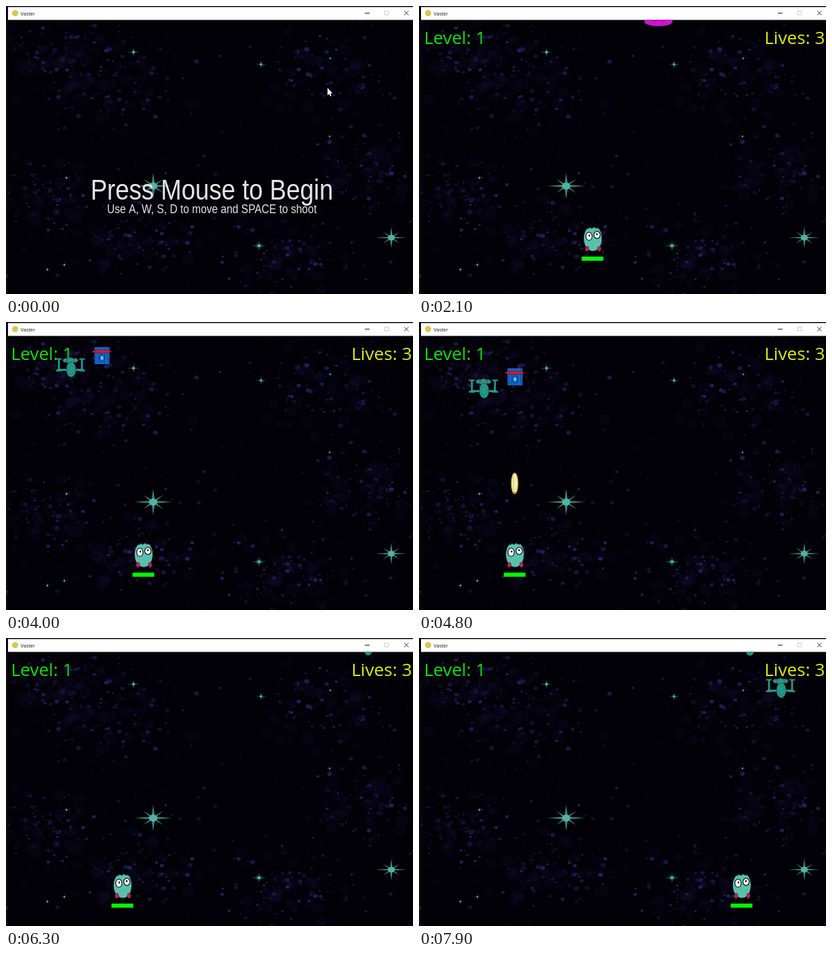
Write an HTML page with a canvas that moves like this. It is 600x424 px and loops after 8 s.

```html
<!DOCTYPE html>
<html lang="en">
<head>
<meta charset="utf-8">
<title>Vaster</title>
<style>
  html, body { margin: 0; width: 100%; height: 100%; overflow: hidden; background: #000; }
  canvas { display: block; }
</style>
</head>
<body>
<canvas id="stage" width="600" height="424"></canvas>
<script>
const W = 600, H = 424, BAR = 20, LOOP = 8000, TICK = 100, START = 800;
const PLAYER_SPEED = 0.19, ENEMY_SPEED = 0.039, SHOT_SPEED = 0.39; // px per ms
const SHOT_FROM = 343, CONTACT = 29;
const SQUEEZE = 0.85; // the game window is narrower than its native aspect
const TAU = Math.PI * 2;
const stage = document.getElementById('stage').getContext('2d');
let ctx = stage;

// The player heads for each goal at constant speed on both axes.
const HOME = { x: 214, y: 449 };
const GOALS = [
  { at: 1500, y: 343 }, { at: 1880, x: 364 }, { at: 3150, x: 141 }, { at: 4900, x: 98 },
  { at: 5515, x: 162 }, { at: 5850, y: 365 }, { at: 6250, x: W }
];
// "enters" is when the centre passes the title bar, "shot" when it is fired at.
const ENEMIES = [
  { draw: squid, x: 353, enters: 2231, shot: 2687, shotX: 364 },
  { draw: drone, x: 95, enters: 2808, shot: 5272, shotX: 98 },
  { draw: box, x: 141, enters: 3256, shot: 4530, shotX: 141 },
  { draw: drone, x: 533, enters: 6530 },
  { draw: drone, x: 487, enters: 8118 }
];
// x, y, reach
const STARS = [
  [188, 68, 10], [376, 86, 9], [478, 77, 5], [477, 192, 5], [89, 253, 6],
  [217, 265, 28], [568, 341, 23], [373, 353, 11], [86, 381, 6], [61, 388, 6]
];
const CLOUDS = [
  [80, 72, 62], [155, 118, 66], [465, 95, 66], [50, 280, 58],
  [185, 345, 66], [535, 245, 56], [420, 375, 60], [300, 220, 300]
];

function seeded(seed) {
  return () => {
    seed = (seed + 0x6D2B79F5) | 0;
    let v = Math.imul(seed ^ (seed >>> 15), seed | 1);
    v ^= v + Math.imul(v ^ (v >>> 7), v | 61);
    return ((v ^ (v >>> 14)) >>> 0) / 4294967296;
  };
}

function rect(x, y, w, h, fill) {
  ctx.fillStyle = fill;
  ctx.fillRect(x, y, w, h);
}

function oval(x, y, rx, ry, fill, stroke, width = 1) {
  ctx.beginPath();
  ctx.ellipse(x, y, rx, ry, 0, 0, TAU);
  if (fill) { ctx.fillStyle = fill; ctx.fill(); }
  if (stroke) { ctx.strokeStyle = stroke; ctx.lineWidth = width; ctx.stroke(); }
}

function line(color, width, ...points) {
  ctx.beginPath();
  points.forEach(([x, y]) => ctx.lineTo(x, y));
  ctx.strokeStyle = color;
  ctx.lineWidth = width;
  ctx.stroke();
}

function label(text, x, y, font, fill, align = 'left', squeeze = 1) {
  ctx.save();
  ctx.translate(x, y);
  ctx.scale(squeeze, 1);
  ctx.font = font;
  ctx.textAlign = align;
  ctx.fillStyle = fill;
  ctx.fillText(text, 0, 0);
  ctx.restore();
}

function put(draw, x, y) {
  ctx.save();
  ctx.translate(x, y);
  draw();
  ctx.restore();
}

function spikes(reach, waist, turn) {
  ctx.beginPath();
  for (let i = 0; i < 8; i++) {
    const r = i % 2 ? reach * waist : reach, a = i * TAU / 8 + turn;
    ctx.lineTo(Math.cos(a) * r, Math.sin(a) * r * 0.7);
  }
  ctx.fill();
}

function star(reach) {
  ctx.fillStyle = '#348a80';
  spikes(reach, 0.12, 0);
  if (reach > 10) spikes(reach * 0.75, 0.12, TAU / 8);
  oval(0, 0, reach * 0.22, reach * 0.19, '#55b0a3');
}

function cloud(x, y, spread, rand) {
  const bell = () => (rand() + rand() + rand() - 1.5) * 1.5;
  for (let i = 0; i < 240; i++) {
    const haze = i < 40 && spread < 100;
    const r = haze ? 4 + 5 * rand() : 0.5 + 2.6 * rand() ** 4;
    const fill = haze ? 'rgba(22, 18, 62, 0.16)' : `hsl(246 52% ${8 + 17 * rand() ** 1.4}%)`;
    oval(x + bell() * spread, y + bell() * spread * 0.65, r * 1.2, r, fill);
  }
}

function titleBar() {
  rect(3, 1.5, W - 3, BAR - 1, '#fff');
  oval(13.5, 10.5, 4.5, 4.5, '#d8c552');
  label('Vaster', 21.5, 13.5, '7.3px "Open Sans", sans-serif', '#111');
  line('#222', 1, [529, 10.5], [536, 10.5]);
  ctx.strokeStyle = '#ccc';
  ctx.strokeRect(558.5, 7.5, 5.5, 5.5);
  line('#222', 0.9, [587, 7.5], [593.5, 13.5]);
  line('#222', 0.9, [593.5, 7.5], [587, 13.5]);
}

function makeBackdrop() {
  const canvas = document.createElement('canvas');
  canvas.width = W;
  canvas.height = H;
  ctx = canvas.getContext('2d');
  const rand = seeded(41);
  rect(0, 0, W, H, '#020107');
  CLOUDS.forEach(([x, y, spread]) => cloud(x, y, spread, rand));
  STARS.forEach(([x, y, reach]) => put(() => star(reach), x, y));
  rect(0, 0, W, 1.5, '#050505');
  rect(0, 0, 3, H, '#0b0b0c');
  label('c', -1, 400, '8px "Open Sans", sans-serif', '#777');
  titleBar();
  ctx = stage;
  return canvas;
}

function squid() {
  const pink = '#d312d0';
  ctx.lineCap = 'round';
  for (let i = -2; i <= 2; i++) {
    const x = i * 6.5;
    ctx.beginPath();
    ctx.moveTo(x * 0.7, 3);
    ctx.bezierCurveTo(x - 5, -4, x + 7, -6, x + 1, -12);
    ctx.strokeStyle = '#a50fa8';
    ctx.lineWidth = 1.8;
    ctx.stroke();
    oval(x + 1, -12.5, 1.9, 1.6, pink);
  }
  oval(0, 4, 13, 7, pink);
  oval(0, 8, 20.8, 6.8, pink);
  for (const x of [-6, 7]) {
    oval(x, 4, 4, 3, '#e9c9e8', '#401040', 1);
    oval(x, 4, 1.4, 1.6, '#111');
  }
}

function drone() {
  const teal = '#279986', dark = '#12584f';
  line(teal, 3, [-19, 4], [19, 4]);
  for (const s of [-1, 1]) {
    line(teal, 2.8, [17 * s, -12], [17 * s, 5]);
    line(teal, 2, [13 * s, -12], [21.5 * s, -12]);
    line(teal, 2.4, [13 * s, 5], [21.5 * s, 5]);
    oval(6.5 * s, -10, 4.5, 3, teal, dark, 0.7);
  }
  oval(0, -9.5, 6, 4.5, teal, dark, 0.7);
  for (const x of [-4, 5]) oval(x, -10, 1.5, 1.1, '#b33a50');
  oval(1, 3.5, 7, 11, teal, dark, 0.9);
  oval(1, 4, 4.2, 7, null, '#1c7a6c', 0.8);
}

function box() {
  rect(-10.5, -12, 22, 25, '#1768cf');
  for (let i = 0; i < 5; i++) line('#0b3c86', 0.8, [-8 + i * 4.2, -11], [-9 + i * 4.5, 12]);
  oval(0.5, 4, 4, 5, '#1b7fdd', '#06245a', 1);
  oval(0.5, 4, 1.3, 2.5, '#8bd6e8');
  oval(0, -5.5, 14, 2.5, '#c21f3c', '#701030', 0.7);
}

function shot() {
  oval(0, 0, 4.7, 15, '#f1edcb', '#d5b82c', 1.5);
  line('#dcb94a', 0.8, [-1.5, -10], [-1.5, 10]);
  oval(0, 13.5, 2, 1.5, '#d98024');
}

function player() {
  ctx.beginPath();
  ctx.moveTo(-5, -17);
  ctx.bezierCurveTo(-15, -12, -15, 7, -7, 15);
  ctx.quadraticCurveTo(1, 20.5, 8, 15);
  ctx.bezierCurveTo(16, 7, 15, -12, 7, -17);
  ctx.closePath();
  ctx.fillStyle = '#58c1ae';
  ctx.fill();
  for (const x of [-8, 10]) oval(x, 14.5, 2.6, 3.7, '#b92b51', '#5c1830', 0.7);
  line('#101a20', 1.6, [-7, -15], [-4, -17.5], [-1, -16], [2, -18], [5, -16.5], [8, -16]);
  oval(-5.2, -4, 4.6, 6, '#fff', '#111', 1.2);
  oval(6.7, -6, 4.6, 5.3, '#fff', '#111', 1.2);
  oval(-4.5, -5, 1.3, 1.4, '#111');
  oval(6.5, -7, 1.3, 1.4, '#111');
  rect(-16, 26, 32, 6, '#00ff00');
}

function cursor() {
  ctx.beginPath();
  [[0, 0], [0, 11], [2.5, 9], [4.2, 12.5], [5.8, 11.8], [4.2, 8.3], [7.3, 8]]
    .forEach(([x, y]) => ctx.lineTo(x, y));
  ctx.fillStyle = '#fff';
  ctx.fill();
}

function approach(from, to, reach) {
  return from + Math.sign(to - from) * Math.min(Math.abs(to - from), reach);
}

function playerAt(t) {
  let { x, y } = HOME;
  for (const goal of GOALS) {
    const reach = Math.max(0, t - goal.at) * PLAYER_SPEED;
    x = approach(x, goal.x ?? x, reach);
    y = approach(y, goal.y ?? y, reach);
  }
  return [x, y];
}

const enemyY = (enemy, t) => BAR + (t - enemy.enters) * ENEMY_SPEED;
const shotY = (enemy, t) => SHOT_FROM - (t - enemy.shot) * SHOT_SPEED;
const isHit = (enemy, t) => shotY(enemy, t) - enemyY(enemy, t) < CONTACT;

function intro() {
  const sans = '"Liberation Sans", Arial, sans-serif';
  label('Press Mouse to Begin', 303.5, 285, `43px ${sans}`, '#e4e4e4', 'center', SQUEEZE);
  label('Use A, W, S, D to move and SPACE to shoot', 303.5, 305, `18.3px ${sans}`,
    '#e4e4e4', 'center', SQUEEZE);
  put(cursor, 474, 120.5);
}

function game(t) {
  const font = '26.2px "Open Sans", sans-serif';
  label('Level: 1', 7.5, 55.5, font, '#08e408');
  label('Lives: 3', 598.5, 55.5, font, '#dcea08', 'right');
  const alive = ENEMIES.filter(enemy => !isHit(enemy, t));
  alive.forEach(enemy => put(enemy.draw, enemy.x, enemyY(enemy, t)));
  put(player, ...playerAt(t));
  alive.filter(enemy => t >= enemy.shot)
    .forEach(enemy => put(shot, enemy.shotX, shotY(enemy, t)));
}

const backdrop = makeBackdrop();
const begin = performance.now();

function frame() {
  const elapsed = Math.max(0, performance.now() - begin) % LOOP;
  const t = Math.floor(elapsed / TICK) * TICK;
  ctx.drawImage(backdrop, 0, 0);
  ctx.save();
  ctx.beginPath();
  ctx.rect(3, BAR + 0.5, W - 3, H - BAR);
  ctx.clip();
  if (t < START) intro();
  else game(t);
  ctx.restore();
  requestAnimationFrame(frame);
}
frame();
</script>
</body>
</html>
```
